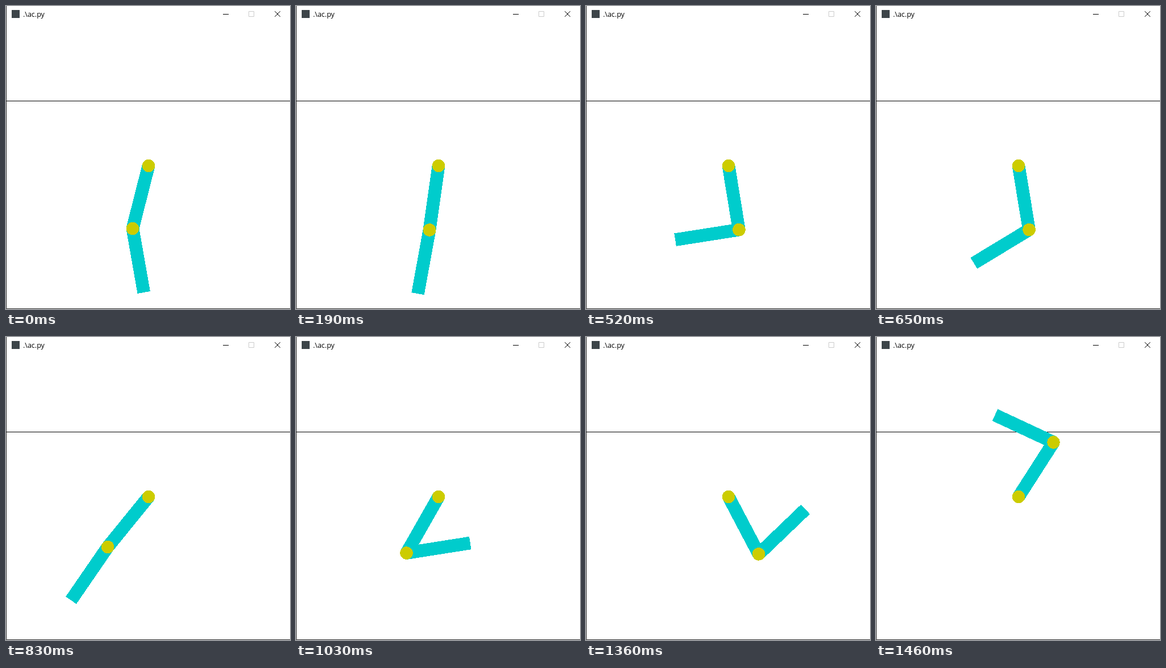
An HTML page for the animation above (1.64 s loop, 500 by 531 pixels).

```html
<!DOCTYPE html>
<html lang="en">
<head>
<meta charset="utf-8">
<title>Two-link swing</title>
<style>
  html, body { margin: 0; width: 100%; height: 100%; overflow: hidden; background: #fff; }
  svg { display: block; width: 500px; height: 531px; }
  text { font: 12.5px "Open Sans", "Noto Sans", sans-serif; }
  .link { fill: #00cccc; shape-rendering: crispEdges; }
  .joint { fill: #cccc00; shape-rendering: crispEdges; }
</style>
</head>
<body>
<svg viewBox="0 0 500 531">
  <rect x="10" y="7" width="14" height="14" fill="#3d4549"/>
  <text x="30" y="19">.\ac.py</text>
  <g fill="none" stroke="#000">
    <path d="M382 14.5h10"/>
    <path d="M427.5 9.5h9v9h-9z" stroke="#ccc"/>
    <path d="M473.5 9.5l9 9m0-9l-9 9" stroke-linecap="square"/>
    <path d="M0 166.5h500"/>
  </g>

  <g id="upper">
    <rect class="link" x="-11.36" width="22.72" height="113.6"/>
    <circle class="joint" r="11.3"/>
    <g id="lower">
      <rect class="link" x="-11.36" width="22.72" height="113.6"/>
      <circle class="joint" r="11.3"/>
    </g>
  </g>

  <path d="M.5 0V530.5H500" fill="none" stroke="#2a2a2a"/>
</svg>
<script>
  const LOOP = 1640;
  const STEP = 50;
  const LENGTH = 113.6;

  // Link angles are degrees from straight down, positive to the right.
  // swing: how far each link [upper, lower] arcs away on the way to the next key.
  const keys = [
    { at: 0,    upper: -14.3, lower: 10,    swing: [30, 0],     arcs: 1 },
    { at: 190,  upper: -8.1,  lower: -10.4, swing: [38, 34],    arcs: 1 },
    { at: 420,  upper: -28.9, lower: -6.4,  swing: [22, -53],   arcs: 1 },
    { at: 650,  upper: 9.4,   lower: -58.9, swing: [-54, -62],  arcs: 2 },
    { at: 1030, upper: -29.8, lower: 98.9,  swing: [100, 33],   arcs: 1 },
    { at: 1220, upper: -37.5, lower: 161.7, swing: [-12, -65],  arcs: 1 },
    { at: 1460, upper: 147.2, lower: 245.1 }
  ];

  const upper = document.getElementById('upper');
  const lower = document.getElementById('lower');
  const mix = (a, b, u) => a + (b - a) * u;

  function poseAt(ms) {
    const i = keys.findLastIndex(key => key.at <= ms);
    const from = keys[i];
    const to = keys[i + 1];
    if (!to) return [from.upper, from.lower];

    const held = Math.floor((ms - from.at) / STEP) * STEP;
    const u = held / (to.at - from.at);
    const wave = Math.sin(Math.PI * from.arcs * u);
    return [
      mix(from.upper, to.upper, u) + from.swing[0] * wave,
      mix(from.lower, to.lower, u) + from.swing[1] * wave
    ];
  }

  function draw(ms) {
    const [a, b] = poseAt(ms);
    upper.setAttribute('transform', `translate(251 280) rotate(${-a})`);
    lower.setAttribute('transform', `translate(0 ${LENGTH}) rotate(${a - b})`);
  }

  const start = performance.now();

  function tick() {
    draw((performance.now() - start) % LOOP);
    requestAnimationFrame(tick);
  }

  draw(0);
  requestAnimationFrame(tick);
</script>
</body>
</html>
```
